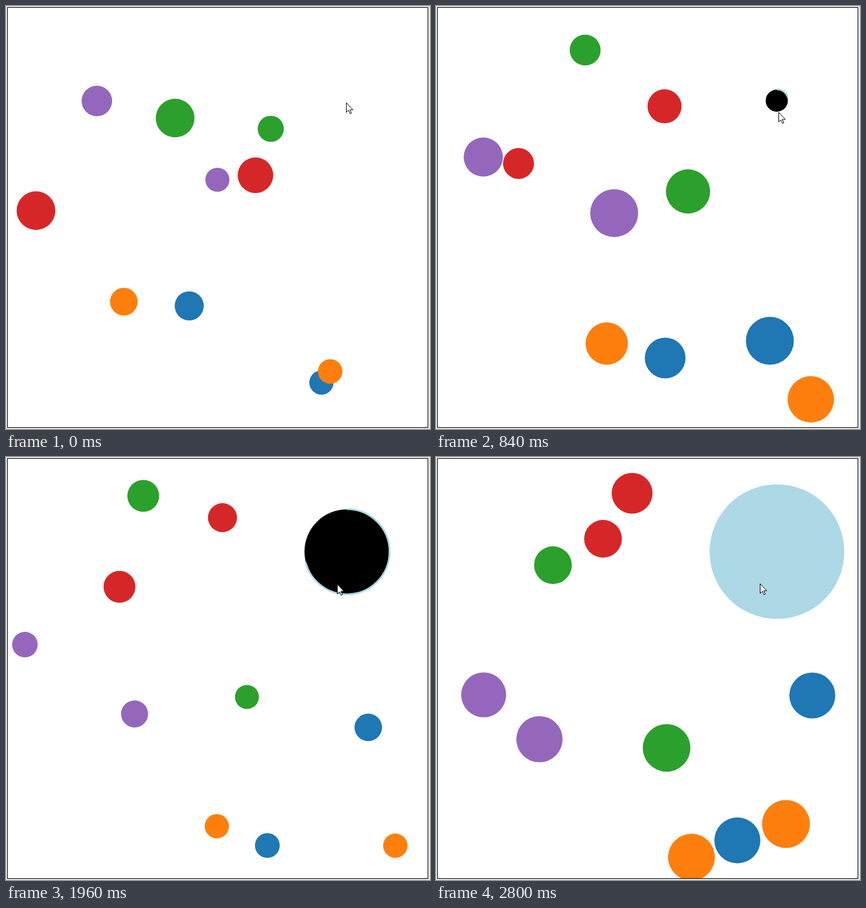
These frames come from a looping animation (707x706 px, 2870 ms). An HTML page with a canvas:

```html
<!DOCTYPE html>
<html lang="en">
<head>
<meta charset="utf-8">
<title>Pulsing balls</title>
<style>
  html, body { margin: 0; width: 100%; height: 100%; overflow: hidden; background: #e0e0e0; }
  canvas { display: block; }
</style>
</head>
<body>
<canvas id="stage" width="707" height="706"></canvas>
<script>
const ctx = document.getElementById('stage').getContext('2d');
const STEP = 70, LAST = 40, RAD = Math.PI / 180, PULSE = 14.05;
const BLUE = '#1f77b4', ORANGE = '#ff7f0e', GREEN = '#2ca02c', RED = '#d62728', PURPLE = '#9467bd';

// Radius pulses between 20 and 40; speed falls as the ball grows.
const radius = (phase, i) => 30 - 10 * Math.cos((phase + PULSE * i) * RAD);

// dx, dy: whole trip without walls; bx, by: where the centre turns back
function ball(color, x, y, dx, dy, phase, power, bx, by) {
  const trip = [0];
  for (let i = 0; i < LAST; i++) {
    trip.push(trip[i] + radius(phase, i + 0.25) ** -power);
  }
  return { color, x, y, dx, dy, phase, bx, by, trip: trip.map(s => s / trip[LAST]) };
}

const balls = [
  ball(BLUE, 305.5, 500.5, 197, 223.6, 305, 2.1, null, 682),
  ball(BLUE, 526, 628.5, 101.5, -230.5, 11.8, 1.87),
  ball(ORANGE, 196.5, 493.5, 229.5, 181.8, 313.3, 2.1, null, 671.6),
  ball(ORANGE, 540.5, 610, 240.8, 132.7, 342, 1.97, 682.4, 677.6),
  ball(GREEN, 282, 187, -87, -296.7, 256.5, 2.1, null, 35.4),
  ball(GREEN, 441.5, 205, -57, 280.5, 325, 2.04),
  ball(RED, 416, 282.5, -89, -293, 272, 2.15, null, 25),
  ball(RED, 50, 341.5, 228.5, -205, 256.5, 2.13),
  ball(PURPLE, 151.5, 158.5, -185, 238.5, 297, 2.12, 23),
  ball(PURPLE, 352.5, 290, -180, 181, 8.8, 1.92)
];

// [step, x, y] of the pointer tip
const pointer = [
  [0, 567.5, 161.5], [6, 568.5, 158.5], [12, 571.5, 177], [18, 573.5, 209.5],
  [24, 560.5, 212.5], [31, 546.5, 212.5], [40, 540.5, 211.5]
];
const arrow = new Path2D('M0 0V16L3.7 12.6L6.3 18.3L8.6 17.3L6 11.7H11Z');

function bounce(from, delta, wall) {
  const to = from + delta;
  return wall != null && (to - wall) * Math.sign(delta) > 0 ? 2 * wall - to : to;
}

function disc(x, y, r, color) {
  ctx.fillStyle = color;
  ctx.beginPath();
  ctx.arc(x, y, r, 0, 2 * Math.PI);
  ctx.fill();
}

function drawBall(b, i) {
  const s = b.trip[i];
  disc(bounce(b.x, b.dx * s, b.bx), bounce(b.y, b.dy * s, b.by), radius(b.phase, i), b.color);
}

function drawCharge(i) {
  const x = 568.5, y = 158, r = 3.25 * (i - 6.3), turn = 11.65 * i - 71;
  if (r <= 0) return;
  if (turn >= 360) return disc(x, y, r + 2.8, '#add8e6');
  disc(x - 0.3, y, r, '#000');
  ctx.strokeStyle = '#add8e6';
  ctx.lineWidth = 3;
  ctx.beginPath();
  ctx.arc(x, y, r + 0.6, -90 * RAD, (turn - 90) * RAD);
  ctx.stroke();
}

function drawPointer(i) {
  const k = Math.max(1, pointer.findIndex(p => p[0] >= i));
  const [i0, x0, y0] = pointer[k - 1], [i1, x1, y1] = pointer[k];
  const u = (i - i0) / (i1 - i0);
  ctx.save();
  ctx.translate(Math.floor(x0 + (x1 - x0) * u) + 0.5, Math.floor(y0 + (y1 - y0) * u) + 0.5);
  ctx.fillStyle = '#fff';
  ctx.strokeStyle = '#000';
  ctx.lineWidth = 1;
  ctx.fill(arrow);
  ctx.stroke(arrow);
  ctx.restore();
}

function draw(i) {
  ctx.fillStyle = '#e0e0e0';
  ctx.fillRect(0, 0, 707, 706);
  ctx.fillStyle = '#000';
  ctx.fillRect(2, 2, 702, 702);
  ctx.save();
  ctx.beginPath();
  ctx.rect(3, 3, 700, 700);
  ctx.clip();
  ctx.fillStyle = '#fff';
  ctx.fillRect(3, 3, 700, 700);
  balls.forEach(b => drawBall(b, i));
  drawCharge(i);
  ctx.restore();
  drawPointer(i);
}

const start = performance.now();
function tick() {
  draw(Math.floor((performance.now() - start) / STEP) % (LAST + 1));
  requestAnimationFrame(tick);
}
tick();
</script>
</body>
</html>
```
